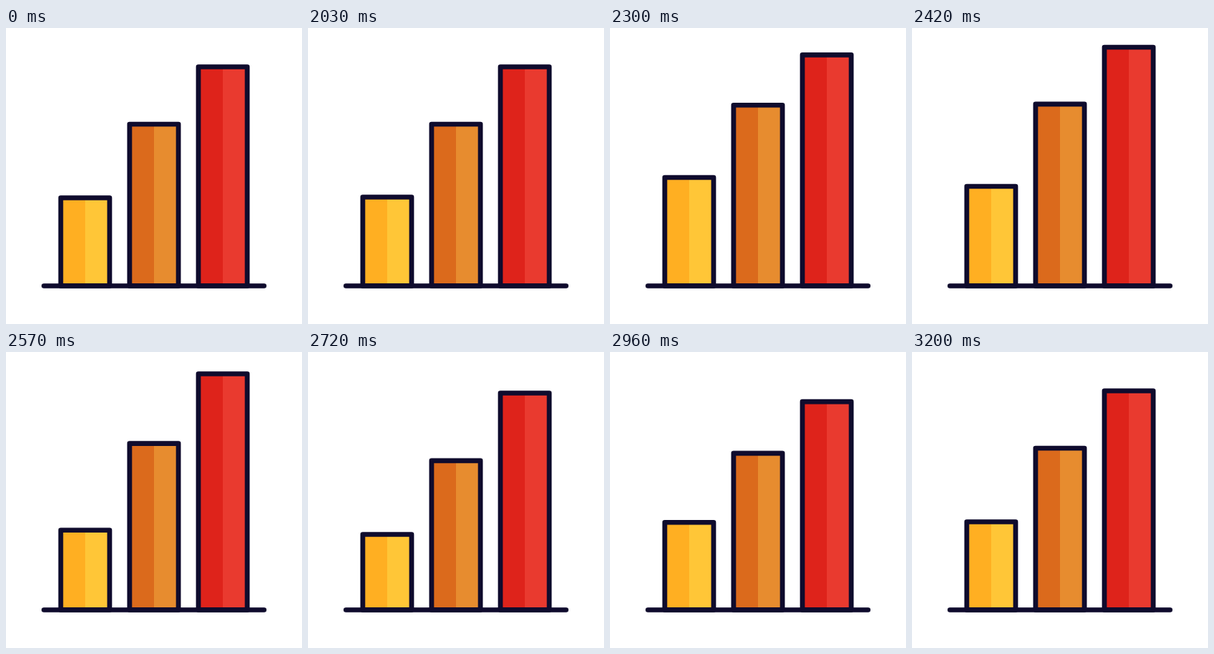
These frames come from a looping animation (400 px wide and 400 px high, 3.23 s). An HTML page with a canvas:

```html
<!DOCTYPE html>
<html lang="en">
<head>
<meta charset="utf-8">
<title>Bar chart</title>
<style>
  html, body { margin: 0; height: 100%; overflow: hidden; background: #fff; }
  canvas { display: block; width: 100vw; height: 100vh; object-fit: contain; }
</style>
</head>
<body>
<canvas id="stage" width="400" height="400"></canvas>
<script>
const ctx = document.getElementById('stage').getContext('2d');
const LOOP = 3230, START = 2000, STEP = 30, BASE = 348.5, HALF = 33;
const RISE = -27.5, DIP = 18.5;

const bars = [
  { x: 107, top: 229.5, delay: 0, left: '#ffaf22', right: '#ffc637' },
  { x: 200, top: 130, delay: 100, left: '#db6a1c', right: '#e78c2f' },
  { x: 293, top: 52.5, delay: 200, left: '#de231b', right: '#e93a2f' }
];

// Cubic bezier easing with handles (a, 0) and (b, 1).
function ease(p, a, b) {
  let lo = 0, hi = 1, u = 0.5;
  for (let i = 0; i < 24; i++) {
    u = (lo + hi) / 2;
    const v = 1 - u;
    if (3 * a * u * v * v + 3 * b * u * u * v + u ** 3 < p) lo = u; else hi = u;
  }
  return u * u * (3 - 2 * u);
}

function offset(t) {
  if (t <= 0 || t >= 1000) return 0;
  if (t < 300) return RISE * ease(t / 300, 0.36, 0.1);
  if (t < 660) return RISE + (DIP - RISE) * ease((t - 300) / 360, 1 / 3, 2 / 3);
  return DIP * (1 - ease((t - 660) / 340, 1 / 3, 2 / 3));
}

function drawBar({ x, top, delay, left, right }, t) {
  const y = top + offset(t - delay);
  ctx.fillStyle = left;
  ctx.fillRect(x - HALF, y, HALF, BASE - y);
  ctx.fillStyle = right;
  ctx.fillRect(x, y, HALF, BASE - y);
  ctx.strokeRect(x - HALF, y, 2 * HALF, BASE - y);
}

function draw(now) {
  const t = Math.floor((now % LOOP - START) / STEP) * STEP;
  ctx.fillStyle = '#fff';
  ctx.fillRect(0, 0, 400, 400);
  ctx.strokeStyle = '#0f0b2d';
  ctx.lineWidth = 6.6;
  ctx.lineCap = ctx.lineJoin = 'round';
  bars.forEach(bar => drawBar(bar, t));
  ctx.beginPath();
  ctx.moveTo(51.3, BASE);
  ctx.lineTo(348.7, BASE);
  ctx.stroke();
}

const begin = performance.now();
function tick() {
  draw(performance.now() - begin);
  requestAnimationFrame(tick);
}
tick();
</script>
</body>
</html>
```
